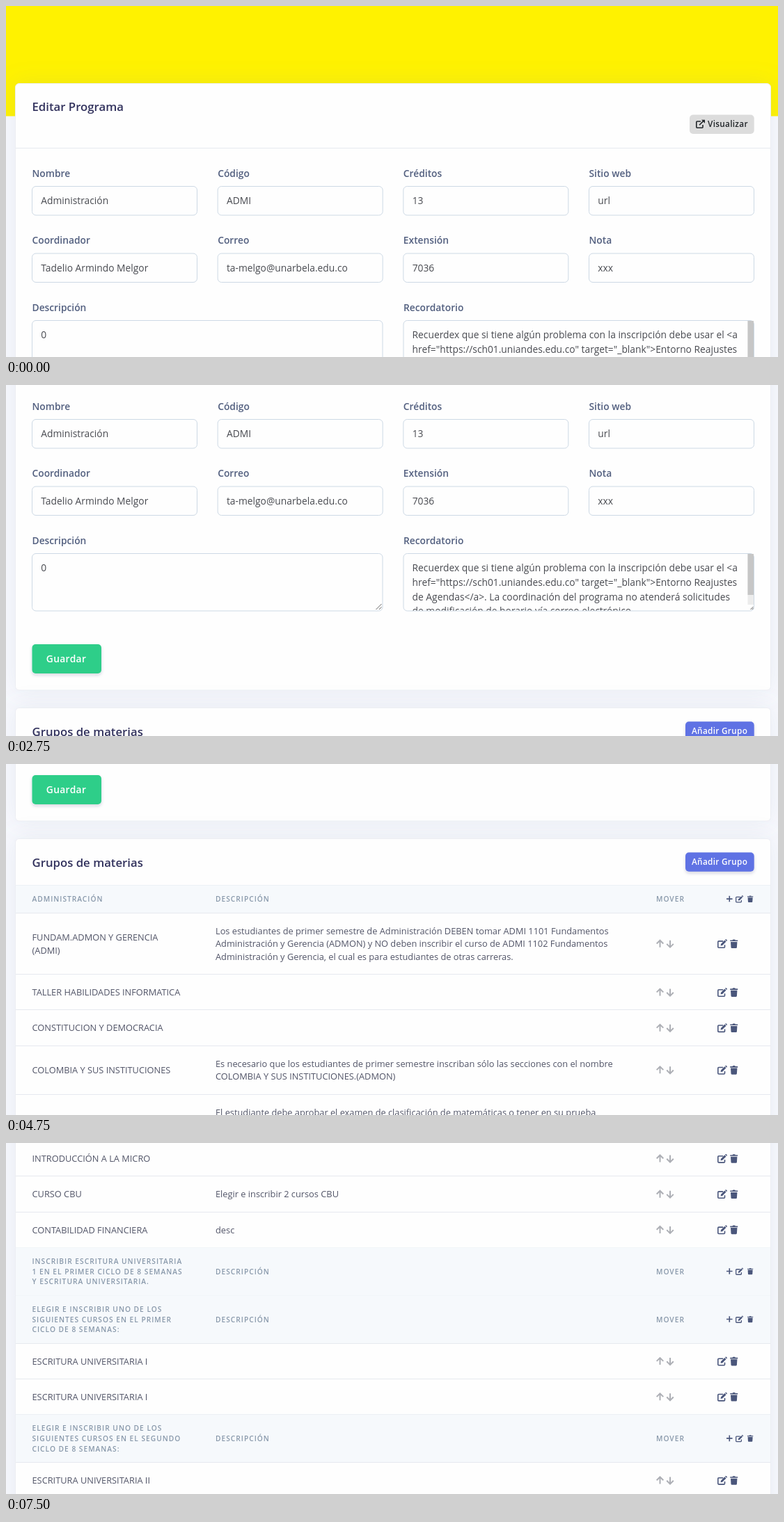
Recreate the animation shown at these times as an HTML page. Size 1109 by 505 pixels, loop 8000 ms.

```html
<!DOCTYPE html>
<html lang="es">
<head>
<meta charset="utf-8">
<title>Editar Programa</title>
<style>
  html, body { margin: 0; width: 100%; height: 100%; overflow: hidden; background: #f8f9fe; }
  svg { display: block; width: 100%; height: 100%; font-family: "Open Sans", sans-serif; }
  text { white-space: pre; }
  .title { font-size: 16.75px; font-weight: 600; fill: #32325d; }
  .label { font-size: 13.8px; font-weight: 600; fill: #525f7f; }
  .value { font-size: 13.8px; fill: #484a50; }
  .cell { font-size: 12.8px; fill: #525568; }
  .head { font-size: 10.24px; font-weight: 600; fill: #8898aa; letter-spacing: .985px; }
  .small { font-size: 11.8px; font-weight: 600; letter-spacing: .025em; }
  .big { font-size: 13.8px; font-weight: 600; letter-spacing: .025em; }
</style>
</head>
<body>
<svg viewBox="0 0 1109 505" preserveAspectRatio="none">
  <defs>
    <filter id="cardShadow" filterUnits="userSpaceOnUse" x="-60" y="40" width="1230" height="1760">
      <feDropShadow dx="0" dy="0" stdDeviation="16" flood-color="#8898aa" flood-opacity=".15"/>
    </filter>
    <filter id="btnShadow" x="-20%" y="-30%" width="140%" height="180%">
      <feDropShadow dx="0" dy="2.5" stdDeviation="2" flood-color="#32325d" flood-opacity=".18"/>
    </filter>
    <clipPath id="noteClip"><rect x="572" y="453" width="493" height="81.5"/></clipPath>
    <g id="edit">
      <path d="M8.2 2.8H1.9Q.8 2.8 .8 3.9V11.2Q.8 12.2 1.9 12.2H9.4Q10.5 12.2 10.5 11.2V8.2" fill="none" stroke="currentColor" stroke-width="1.6"/>
      <path d="M4.6 9.3L5 6.8 10.4 1.4 12.5 3.5 7.1 8.9ZM11 .8L11.7.2Q12.2-.2 12.8.3L13.7 1.2Q14.2 1.8 13.7 2.3L13.1 2.9Z" fill="currentColor"/>
    </g>
    <path id="trash" fill="currentColor" d="M0 1H3.4L4 0H7L7.6 1H11V2.6H0ZM.8 3.5H10.2L9.7 11.5Q9.6 12.6 8.5 12.6H2.5Q1.4 12.6 1.3 11.5Z"/>
    <path id="arrow" fill="none" stroke="#adafb5" stroke-width="2" d="M.7 5.8L5.5 1 10.3 5.8M5.5 1.4V11"/>
    <path id="plus" fill="none" stroke="currentColor" stroke-width="1.7" d="M0 4.5H9M4.5 0V9"/>
  </defs>
  <g id="page"></g>
</svg>
<script>
const NS = 'http://www.w3.org/2000/svg';
const page = document.getElementById('page');
const LINE = '#e6e9ef', INK = '#4a567b';

function add(tag, attrs, parent = page) {
  const el = document.createElementNS(NS, tag);
  for (const key in attrs) el.setAttribute(key, attrs[key]);
  return parent.appendChild(el);
}

function text(x, y, cls, str, extra = {}) {
  const el = add('text', { x, y, class: cls, ...extra });
  el.textContent = str;
  return el;
}

// Lines stacked around a vertical centre.
function block(x, cy, cls, str, step, drop) {
  const lines = str.split('\n');
  lines.forEach((s, i) => text(x, cy + drop + (i - (lines.length - 1) / 2) * step, cls, s));
}

function box(x, y, width, height, fill, extra = {}) {
  return add('rect', { x, y, width, height, fill, ...extra });
}

const rule = y => box(14, Math.round(y), 1084, 1, LINE);

function icon(name, x, y, scale = 1, color = INK, turn = '') {
  add('use', { href: '#' + name, color, transform: `translate(${x} ${y}) scale(${scale}) ${turn}` });
}

function card(y, height) {
  box(13.5, y, 1085, height, '#fefefe', { rx: 5.5, stroke: '#eceef3', filter: 'url(#cardShadow)' });
}

function button(x, y, w, h, fill, cls, str, tx, ty, color) {
  box(x, y, w, h, fill, { rx: 5, filter: 'url(#btnShadow)' });
  text(tx, ty, cls, str, { fill: color });
}

function field(x, y, width, height, label, value) {
  text(x, y - 13.3, 'label', label);
  box(x, y + .5, width, height, '#fefefe', { rx: 5.5, stroke: '#cdd9e5' });
  if (value) text(x + 12.8, y + 26, 'value', value);
}

function grip(x, y, size) {
  add('path', {
    d: `M${x - size} ${y}L${x} ${y - size}M${x - size * .45} ${y}L${x} ${y - size * .45}`,
    stroke: '#666', fill: 'none'
  });
}

function buildForm() {
  box(0, 0, 1109, 158.5, '#fff200');
  card(111.5, 537.5);
  text(37.5, 150.5, 'title', 'Editar Programa');
  box(982, 156.5, 92.7, 27.5, '#dcdcdc', { rx: 5 });
  add('path', {
    d: 'M998 166H992.8Q991.8 166 991.8 167V174.2Q991.8 175.2 992.8 175.2H1000Q1001 175.2 1001 174.2V171M996 171.3L1002.4 164.9',
    fill: 'none', stroke: '#212529', 'stroke-width': 1.6
  });
  add('path', { d: 'M999 163.8H1004V168.8Z', fill: '#212529' });
  text(1008, 174.3, 'small', 'Visualizar', { fill: '#212529' });
  rule(204);

  const rows = [
    [['Nombre', 'Administración'], ['Código', 'ADMI'], ['Créditos', '13'], ['Sitio web', 'url']],
    [['Coordinador', 'Tadelio Armindo Melgor'], ['Correo', 'ta-melgo@unarbela.edu.co'], ['Extensión', '7036'], ['Nota', 'xxx']]
  ];
  rows.forEach((row, r) => row.forEach(([label, value], c) =>
    field(37.5 + c * 266.67, 259 + r * 96.5, 237, 41.5, label, value)));

  field(37.5, 452, 503.5, 82.5, 'Descripción', '0');
  grip(539.5, 533, 8);
  field(571, 452, 503.5, 82.5, 'Recordatorio');
  const clip = add('g', { 'clip-path': 'url(#noteClip)' });
  [
    'Recuerdex que si tiene algún problema con la inscripción debe usar el <a',
    'href="https://sch01.uniandes.edu.co" target="_blank">Entorno Reajustes',
    'de Agendas</a>. La coordinación del programa no atenderá solicitudes',
    'de modificación de horario vía correo electrónico.'
  ].forEach((s, i) => clip.append(text(583.6, 478.2 + i * 20.7, 'value', s)));
  box(1065.5, 453, 8.5, 73, '#ececec');
  box(1065.5, 453, 8.5, 59, '#c6c6c6');
  grip(1073.5, 533, 4);

  button(37.5, 583, 99.5, 42, '#2dce89', 'big', 'Guardar', 57.8, 609, '#fff');
}

function headRow(y, h, title) {
  const cy = y + h / 2;
  box(14, y, 1084, h, '#f6f9fc');
  block(37.5, cy, 'head', title, 14.75, 3.8);
  block(301, cy, 'head', 'DESCRIPCIÓN', 0, 3.8);
  block(934, cy, 'head', 'MOVER', 0, 3.8);
  icon('plus', 1035, cy - 4.5, .95);
  icon('edit', 1048, cy - 5.2, .8);
  icon('trash', 1065, cy - 4.8, .75);
}

function bodyRow(y, h, title, note) {
  const cy = y + h / 2 + .3;
  block(37.5, cy, 'cell', title, 18.7, 4.6);
  if (note) block(301, cy, 'cell', note, 18.7, 4.6);
  icon('arrow', 934, cy - 6);
  icon('arrow', 948.5, cy - 6, 1, INK, 'rotate(180 5.5 6)');
  icon('edit', 1022, cy - 6.6);
  icon('trash', 1040.2, cy - 6.3);
}

function buildGroups() {
  card(674.5, 1000);
  text(37.5, 714.7, 'title', 'Grupos de materias');
  button(976, 694.3, 98.7, 27.5, '#5e72e4', 'small', 'Añadir Grupo', 985, 712, '#fff');

  const pick = part => `#ELEGIR E INSCRIBIR UNO DE LOS\nSIGUIENTES CURSOS EN EL ${part}\nCICLO DE 8 SEMANAS:`;
  const rows = [
    ['#ADMINISTRACIÓN'],
    ['FUNDAM.ADMON Y GERENCIA\n(ADMI)',
      'Los estudiantes de primer semestre de Administración DEBEN tomar ADMI 1101 Fundamentos\n' +
      'Administración y Gerencia (ADMON) y NO deben inscribir el curso de ADMI 1102 Fundamentos\n' +
      'Administración y Gerencia, el cual es para estudiantes de otras carreras.'],
    ['TALLER HABILIDADES INFORMATICA'],
    ['CONSTITUCION Y DEMOCRACIA'],
    ['COLOMBIA Y SUS INSTITUCIONES',
      'Es necesario que los estudiantes de primer semestre inscriban sólo las secciones con el nombre\n' +
      'COLOMBIA Y SUS INSTITUCIONES.(ADMON)'],
    ['CALCULO DIFERENCIAL',
      'El estudiante debe aprobar el examen de clasificación de matemáticas o tener en su prueba\n' +
      'NOVAR24-Matemáticas un puntaje igual o superior a 79 puntos para poderla inscribir, de lo\n' +
      'contrario debe inscribir Precálculo (MATE 1201).'],
    ['INTRODUCCIÓN A LA MICRO'],
    ['CURSO CBU', 'Elegir e inscribir 2 cursos CBU'],
    ['CONTABILIDAD FINANCIERA', 'desc'],
    ['#INSCRIBIR ESCRITURA UNIVERSITARIA\n1 EN EL PRIMER CICLO DE 8 SEMANAS\nY ESCRITURA UNIVERSITARIA.'],
    [pick('PRIMER')],
    ['ESCRITURA UNIVERSITARIA I'],
    ['ESCRITURA UNIVERSITARIA I'],
    [pick('SEGUNDO')],
    ['ESCRITURA UNIVERSITARIA II']
  ];
  let y = 741.5;
  rule(741);
  for (const [title, note = ''] of rows) {
    const isHead = title[0] === '#';
    const count = Math.max(title.split('\n').length, note.split('\n').length);
    const h = isHead ? 39.6 + (count - 1) * 14.7 : 51.2 + (count - 1) * 18.7;
    if (isHead) headRow(y, h, title.slice(1));
    else bodyRow(y, h, title, note);
    y += h;
    rule(y - .5);
  }
}

// Scroll position: [ms, px]
const stops = [[1000, 0], [1750, 122], [2750, 210], [3750, 386], [4750, 567], [6500, 901], [7250, 1134]];
const LOOP = 8000, TICK = 250;

function scrollAt(t) {
  if (t <= stops[0][0]) return 0;
  for (let i = 1; i < stops.length; i++) {
    const [t0, y0] = stops[i - 1], [t1, y1] = stops[i];
    if (t <= t1) return Math.round(y0 + (y1 - y0) * (t - t0) / (t1 - t0));
  }
  return stops[stops.length - 1][1];
}

function draw(now) {
  const t = Math.floor(now % LOOP / TICK) * TICK;
  page.setAttribute('transform', `translate(0 ${-scrollAt(t)})`);
}

buildForm();
buildGroups();
const start = performance.now();
(function loop() {
  draw(performance.now() - start);
  requestAnimationFrame(loop);
})();
</script>
</body>
</html>
```
